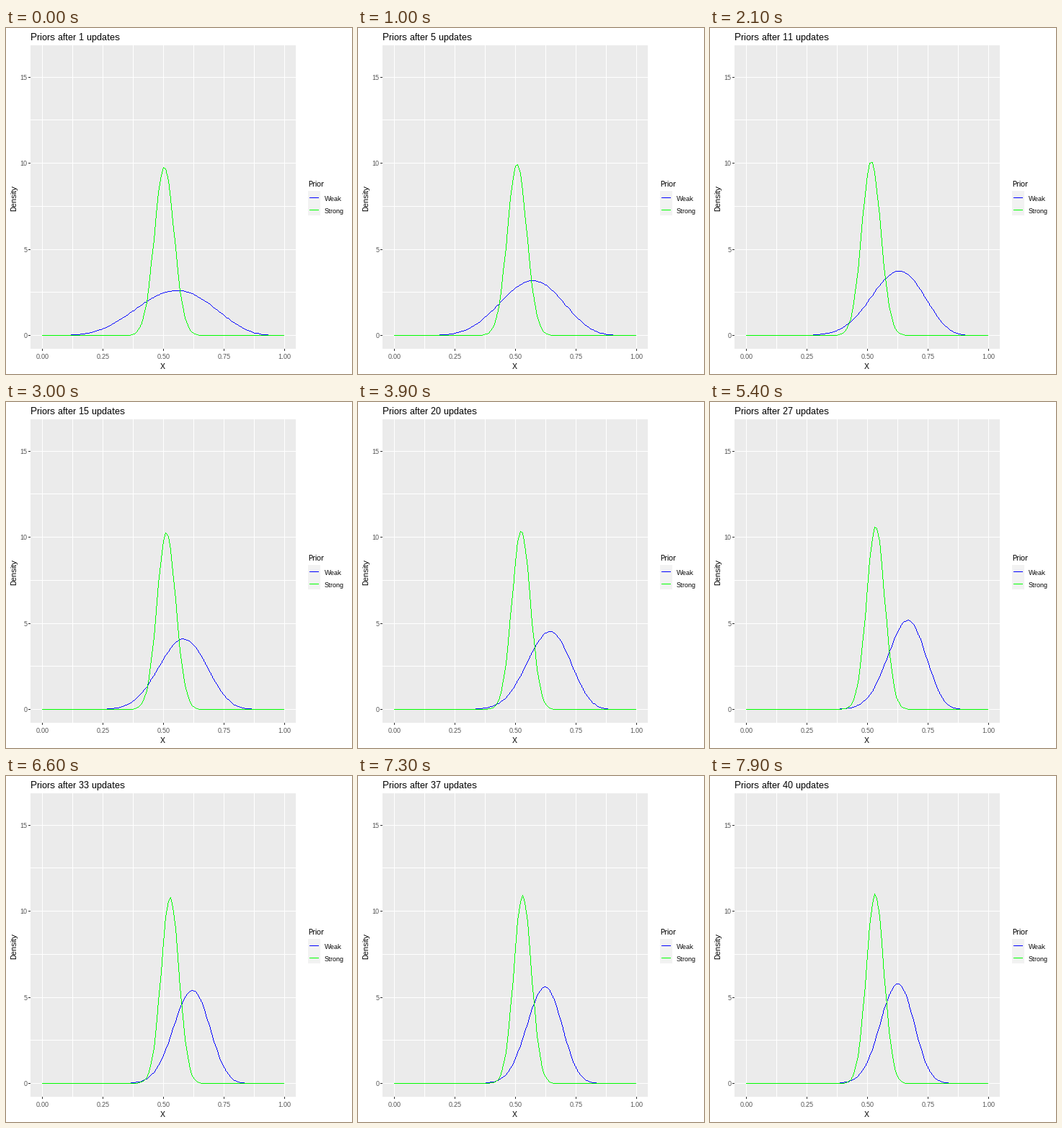
A matplotlib script for the animation above (8000 ms loop, 480 px wide and 480 px high).

```python
import math

import numpy as np
import matplotlib.pyplot as plt
from matplotlib.animation import FuncAnimation
from matplotlib.patches import Rectangle

SIZE, DPI = 480, 100
FRAMES, STEP_MS = 80, 100
X0, X_UNIT = 50.4, 335.2
Y0, Y_UNIT = 425.9, 23.878
LEFT, RIGHT, TOP, BOTTOM = 34, 402, 24, 445
BLUE, GREEN = (0, 0, 255, 255), (0, 255, 0, 255)

# Outcome of each trial, 1 = success
TRIALS = [int(c) for c in "1011011101101010111101111110010100101101"]
WINS = np.cumsum(TRIALS)
GRID = np.linspace(0, 1, 101)

plt.rcParams["font.family"] = "Liberation Sans"
plt.rcParams["text.hinting"] = "default"
plt.rcParams["text.hinting_factor"] = 1
fig = plt.figure(figsize=(SIZE / DPI, SIZE / DPI), dpi=DPI, facecolor="white")
ax = fig.add_axes([0, 0, 1, 1])
ax.set_xlim(0, SIZE)
ax.set_ylim(SIZE, 0)
ax.axis("off")


def col(x):
    return np.floor(X0 + X_UNIT * x + 0.5)


def row(y):
    return np.floor(Y0 - Y_UNIT * y + 0.5)


def box(x, y, w, h, color):
    ax.add_patch(Rectangle((x, y), w, h, fc=color, lw=0, antialiased=False))


def label(x, y, text, px, color="black", **kw):
    return ax.text(x, y, text, fontsize=px * 72 / DPI, color=color,
                   va=kw.pop("va", "baseline"), **kw)


def beta_pdf(a, b):
    norm = math.lgamma(a + b) - math.lgamma(a) - math.lgamma(b)
    x = GRID[1:-1]
    inner = np.exp(norm + (a - 1) * np.log(x) + (b - 1) * np.log(1 - x))
    return np.concatenate(([0], inner, [0]))


def draw_curve(canvas, density, color):
    """One-pixel polyline without smoothing; its end point stays open."""
    px, py = col(GRID), row(density)
    for i in range(len(px) - 1):
        n = int(max(abs(px[i + 1] - px[i]), abs(py[i + 1] - py[i])))
        s = np.arange(n) / n
        xs = np.round(px[i] + s * (px[i + 1] - px[i])).astype(int)
        ys = np.round(py[i] + s * (py[i + 1] - py[i])).astype(int)
        canvas[ys, xs] = color


def draw_panel():
    box(LEFT, TOP, RIGHT - LEFT, BOTTOM - TOP, "#EBEBEB")
    for x in np.arange(0, 1.01, 0.125):
        box(col(x), TOP, 1, BOTTOM - TOP, "white")
    for y in np.arange(0, 15.1, 2.5):
        box(LEFT, row(y), RIGHT - LEFT, 1, "white")
    for x in np.arange(0, 1.01, 0.25):
        box(col(x), BOTTOM, 1, 3, "#333333")
        label(col(x) + 0.5, 459, f"{x:.2f}", 9, "#4D4D4D", ha="center")
    for y in range(0, 16, 5):
        box(LEFT - 3, row(y), 3, 1, "#333333")
        label(29.5, row(y) + 4, str(y), 9, "#4D4D4D", ha="right")
    label(217.5, 473, "X", 11, ha="center")
    label(11.5, 236, "Density", 11, ha="center", va="center", rotation=90)


def draw_legend():
    label(419, 220, "Prior", 11)
    for y, name, color in ((226, "Weak", "blue"), (243, "Strong", "lime")):
        box(419, y, 17, 17, "#F2F2F2")
        box(421, y + 9, 13, 1, color)
        label(442, y + 14, name, 9)


draw_panel()
draw_legend()
title = label(34, 17, "", 13)
curves = ax.imshow(np.zeros((SIZE, SIZE, 4), np.uint8), aspect="auto",
                   extent=(0, SIZE, SIZE, 0), interpolation="nearest", zorder=3)


def update(k):
    t = 1 + 49 * k / 99
    n = round(t)
    wins = int(WINS[n - 1])
    losses = n - wins
    canvas = np.zeros((SIZE, SIZE, 4), np.uint8)
    draw_curve(canvas, beta_pdf(5 + wins, 5 + losses), BLUE)
    draw_curve(canvas, beta_pdf(75 + wins, 75 + losses), GREEN)
    curves.set_data(canvas)
    title.set_text(f"Priors after {int(t)} updates")
    return curves, title


anim = FuncAnimation(fig, update, frames=FRAMES, interval=STEP_MS,
                     repeat=True, repeat_delay=0, blit=False)
plt.show()
```
